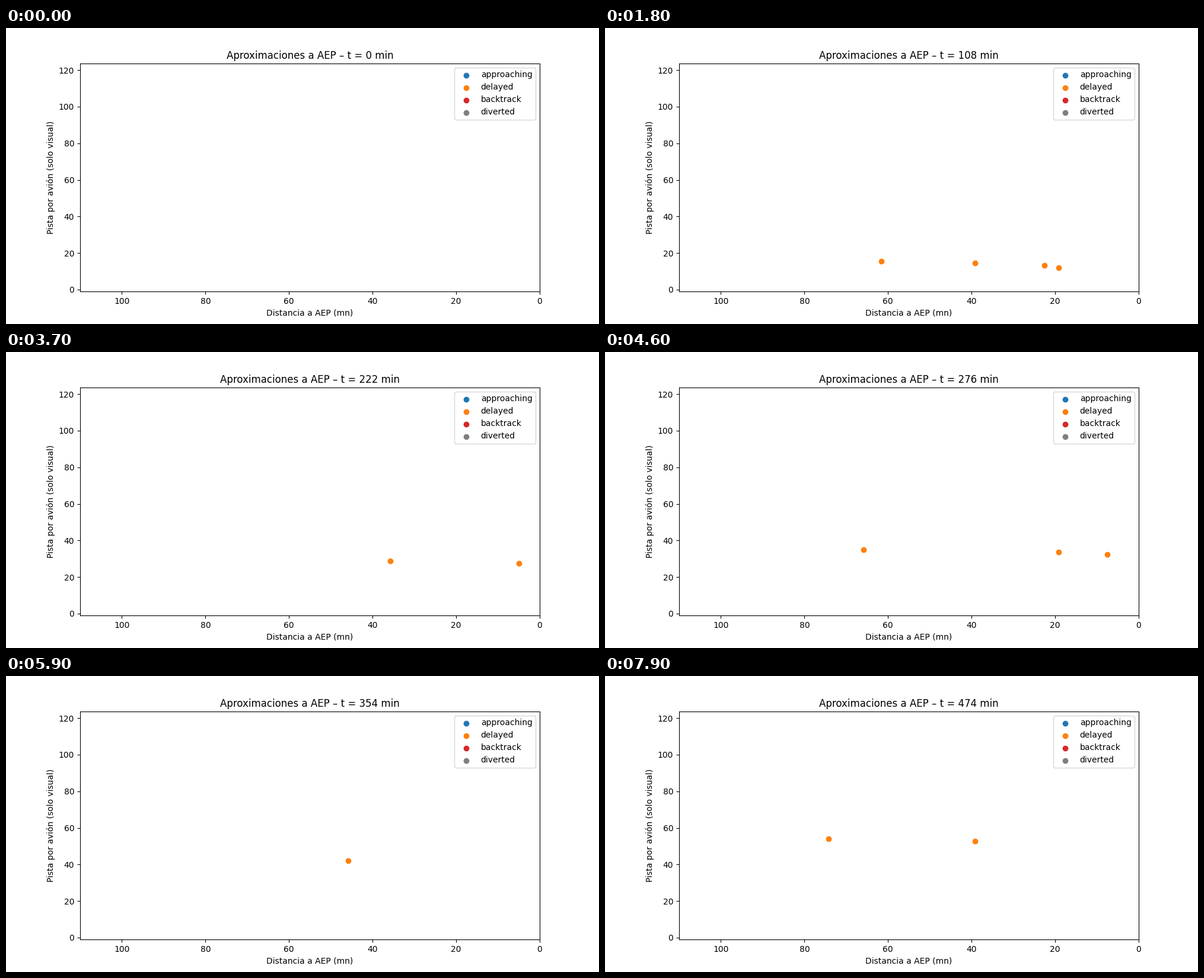
Recreate the animation shown at these times as a matplotlib script. Size 1000 by 500 pixels, loop 8000 ms.

```python
import random

import matplotlib.pyplot as plt
import numpy as np
from matplotlib.animation import FuncAnimation

FRAMES = 80
STEP = 6            # simulated minutes per frame
LANE_GAP = 1.2
TOTAL_PLANES = 103
EPS = 1e-6

COLORS = {
    "approaching": "tab:blue",
    "delayed": "tab:orange",
    "backtrack": "tab:red",
    "diverted": "tab:gray",
}

# lower distance limit (nm), slowest and fastest speed (kt)
ZONES = [(100, 300, 500), (50, 250, 300), (15, 200, 250),
         (5 + 2 * EPS, 150, 200), (0, 120, 150)]


def speed(dist, lane):
    for limit, slow, fast in ZONES:
        if dist >= limit - EPS:
            return max(slow, fast - 20 * lane)
    return 0


def descent(lane):
    """Distance at the end of each minute until touchdown."""
    dist, track = 100.0, []
    while True:
        dist -= speed(dist, lane) / 60
        if dist <= EPS:
            return track
        track.append(dist)


rng = random.Random(42)
births = [m for m in range(FRAMES * STEP) if rng.random() < 0.1]
tracks = [descent(lane) for lane in range(len(births))]


def positions(minute):
    points = {name: [] for name in COLORS}
    for lane, (born, track) in enumerate(zip(births, tracks)):
        age = minute - born
        if 0 <= age < len(track):
            status = "delayed" if lane else "approaching"
            points[status].append((track[age], lane * LANE_GAP))
    return points


fig, ax = plt.subplots(figsize=(10, 5), dpi=100)
ax.set_xlim(110, 0)
ax.set_ylim(-1, TOTAL_PLANES * LANE_GAP)
ax.set_xlabel("Distancia a AEP (mn)")
ax.set_ylabel("Pista por avión (solo visual)")
dots = {name: ax.scatter([], [], color=color, label=name)
        for name, color in COLORS.items()}
ax.legend(loc="upper right")
title = ax.set_title("")


def update(frame):
    minute = frame * STEP
    for name, pts in positions(minute).items():
        dots[name].set_offsets(np.array(pts).reshape(-1, 2))
    title.set_text(f"Aproximaciones a AEP – t = {minute} min")
    return [*dots.values(), title]


anim = FuncAnimation(fig, update, frames=FRAMES, interval=100, repeat=True)
plt.show()
```
